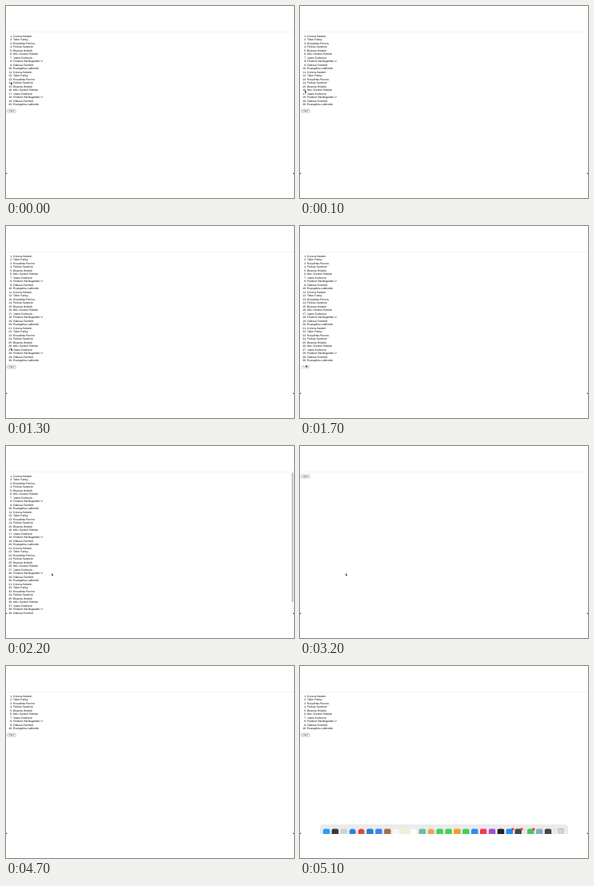
Recreate the animation shown at these times as an HTML page. Size 360 by 240 pixels, loop 5.2 s.

```html
<!DOCTYPE html>
<html lang="en">
<head>
<meta charset="utf-8">
<title>Paged list</title>
<style>
  html, body { margin: 0; width: 100%; height: 100%; overflow: hidden; background: #fff; }
  svg { display: block; width: 100%; height: 100%; }
  text { text-rendering: geometricPrecision; }
  #list { font: 3.42px "Liberation Sans", Arial, sans-serif; fill: #000; }
  #label { font: 2.5px "Noto Sans CJK KR", "Noto Sans CJK JP", "Noto Sans CJK", sans-serif; }
</style>
</head>
<body>
<svg id="stage" viewBox="0 0 360 240">
  <defs>
    <clipPath id="screen"><rect width="360" height="210"/></clipPath>
  </defs>
  <g clip-path="url(#screen)">
    <path d="M0 32.5H360" stroke="#f0f0f0" stroke-width=".8"/>
    <g id="list"></g>
    <g id="button">
      <rect x="1.5" y="-2.2" width="10.8" height="4.4" rx=".8" fill="#f0f0f0" stroke-width=".35"/>
      <text id="label" x="6.9" y=".9" text-anchor="middle">더보기</text>
    </g>
    <g id="scrollbar">
      <rect x="356.3" y="33" width="3.7" height="177" fill="#fafafa"/>
      <rect x="357.2" y="33.3" width="2" height="162" rx="1" fill="#c1c1c1"/>
    </g>
    <g id="dock">
      <rect x="25.3" y="198.5" width="309.4" height="20" rx="4" fill="#ebebeb" stroke="#dcdcdc" stroke-width=".4"/>
      <path d="M280.5 202V210M318 202V210" stroke="#c8c8c8" stroke-width=".4"/>
      <path d="M322.6 203.4H329.4L328.6 211H323.4Z" fill="#d6d7d9" stroke="#8f9194" stroke-width=".5"/>
    </g>
    <path id="cursor" d="M0 0V3.3L.8 2.6 1.3 3.8 1.9 3.5 1.4 2.4H2.4Z" fill="#000" stroke="#fff" stroke-width=".25"/>
    <path d="M0 207.8Q0 210 2.4 210H0ZM360 207.8Q360 210 357.6 210H360Z"/>
  </g>
</svg>
<script>
const LOOP = 5200, TICK = 100, ROW = 4.5, TOP = 37.6;
const NAMES = [
  "Corena Hadwin", "Tobin Farley", "Rosalinda Perrow", "Felicity Sandock", "Brianna Holstrik",
  "Mrs. Gordon Paltrick", "Justin Corbrook", "Frederic Bertilsgarden V", "Odessa Farnholt", "Evangelina LaMonde"
];
const ICONS = ("#2b9df2 #38383d #cfd2d6 #2f80e4 #dd4a3c #2b7fd0 #3d83ee #a37143 #f9f6f6 #f8efcf #fdfdfd " +
  "#68bfa5 #efa349 #43d160 #43d160 #f59b28 #42cd58 #2b8cf0 #f43a54 #a34dda #222226 #2190f4 #47494d " +
  "#45c95a #8fa9c4 #45464a").split(" ");
const ROUND = [3, 4, 12];
const BADGES = [266, 277, 292];

// [start, value]
const COUNTS = [[0, 20], [700, 30], [1800, 40], [3200, 0], [3300, 10]];
// [start, end, x, y]: the pointer reaches x, y at end
const MOVES = [
  [0, 0, 6, 95.2], [0, 100, 6.1, 105.2], [600, 700, 4.6, 131.4],
  [1000, 1600, 7.5, 173.5], [2000, 2200, 57, 159], [4500, 4700, 1, 210]
];

const $ = id => document.getElementById(id);
const list = $("list"), button = $("button"), box = button.firstElementChild;

function add(parent, tag, attrs, text = "") {
  const el = document.createElementNS("http://www.w3.org/2000/svg", tag);
  for (const key in attrs) el.setAttribute(key, attrs[key]);
  el.textContent = text;
  return parent.appendChild(el);
}

const show = (el, on) => el.setAttribute("visibility", on ? "visible" : "hidden");
const place = (el, x, y) => el.setAttribute("transform", `translate(${x} ${y})`);
const ease = p => p * p * (3 - 2 * p);

const rows = Array.from({ length: 40 }, (_, i) => {
  const row = add(list, "g", {});
  const y = TOP + ROW * i + 1.2;
  add(row, "text", { x: 8, y, "text-anchor": "end" }, `${i + 1}.`);
  add(row, "text", { x: 9, y }, NAMES[i % NAMES.length]);
  return row;
});

ICONS.forEach((fill, i) => {
  const x = 33 + 10.9 * i + (i < 23 ? 0 : 4.6);
  if (ROUND.includes(i)) add($("dock"), "circle", { cx: x, cy: 207.6, r: 4, fill });
  else add($("dock"), "rect", { x: x - 4.2, y: 203.4, width: 8.4, height: 8.4, rx: 2, fill });
});
BADGES.forEach(cx => add($("dock"), "circle", { cx, cy: 204, r: 1.7, fill: "#f2403a" }));

function pointer(t) {
  let [, , x, y] = MOVES[0];
  for (const [start, end, toX, toY] of MOVES.slice(1)) {
    if (t <= start) break;
    const p = ease(Math.min(1, (t - start) / (end - start)));
    x += (toX - x) * p;
    y += (toY - y) * p;
  }
  return [x, y];
}

function draw(time) {
  const t = Math.floor((time % LOOP) / TICK) * TICK;
  const count = COUNTS.filter(([start]) => t >= start).pop()[1];
  const loading = t === 1700;

  rows.forEach((row, i) => show(row, i < count));
  place(button, 0, count ? TOP + ROW * (count - 1) + 8 : 38);
  $("label").setAttribute("fill", loading ? "#8a8a8a" : "#222");
  box.setAttribute("stroke", loading ? "#cfcfcf" : "#8c8c8c");
  show($("scrollbar"), count === 40);
  show($("dock"), t >= 5100);
  place($("cursor"), ...pointer(t));
  show($("cursor"), t < 4700);
}

const begin = performance.now();
function frame() {
  draw(performance.now() - begin);
  requestAnimationFrame(frame);
}
frame();
</script>
</body>
</html>
```
